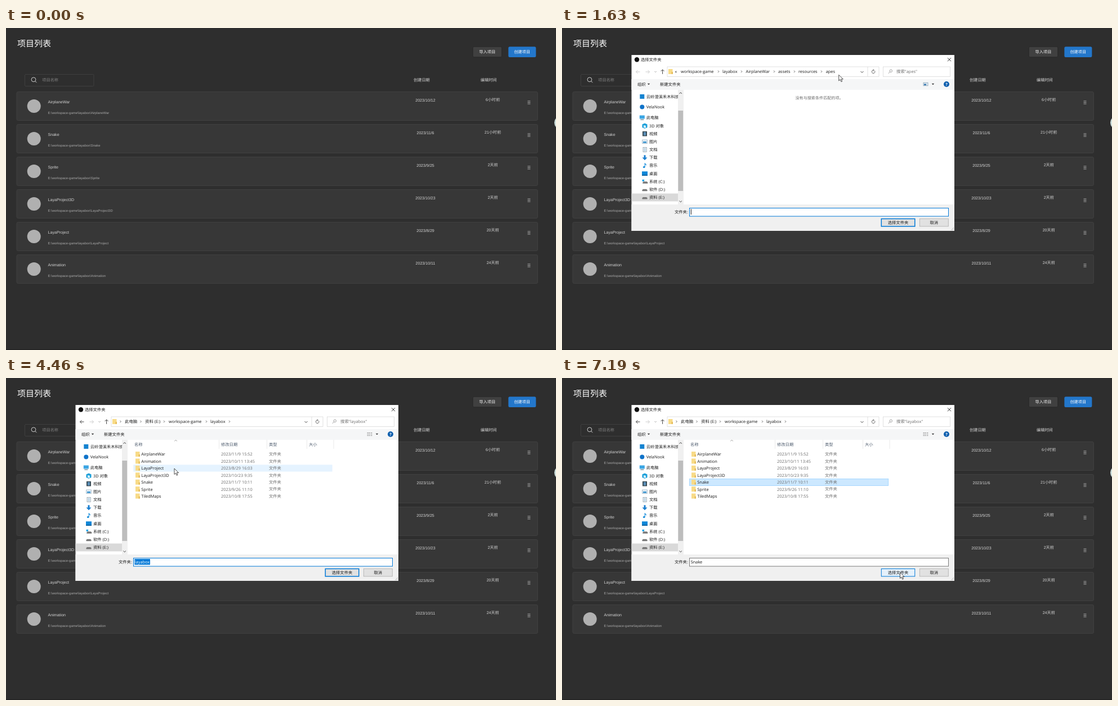
Recreate the animation shown at these times as an HTML page. Size 977 by 573 pixels, loop 8 s.

```html
<!DOCTYPE html>
<html lang="zh-CN">
<head>
<meta charset="utf-8">
<title>项目列表</title>
<style>
html, body { margin: 0; width: 100%; height: 100%; overflow: hidden; background: #2e2e2e; }
svg { display: block; width: 100vw; height: 100vh; }
text { text-rendering: geometricPrecision; white-space: pre; }
.app text { font-family: "Liberation Sans", "Noto Sans CJK SC", "Noto Sans CJK", sans-serif; }
.dlg text { font-family: "Open Sans", "Noto Sans CJK SC", "Noto Sans CJK", sans-serif; }
</style>
</head>
<body>
<svg id="stage" viewBox="0 0 977 573"></svg>
<script>
const LOOP = 8000;

// Markup helpers; text is placed by its vertical centre.
const rect = (x, y, w, h, fill, more = '') =>
  `<rect x="${x}" y="${y}" width="${w}" height="${h}" fill="${fill}" ${more}/>`;
const box = (x, y, w, h, fill, stroke, more = '') =>
  rect(x, y, w, h, fill, `stroke="${stroke}" ${more}`);
const dot = (x, y, r, fill, more = '') => `<circle cx="${x}" cy="${y}" r="${r}" fill="${fill}" ${more}/>`;
const line = (d, stroke, w = 0.8, more = '') =>
  `<path d="${d}" fill="none" stroke="${stroke}" stroke-width="${w}" ${more}/>`;
const shape = (d, fill) => `<path d="${d}" fill="${fill}"/>`;
const text = (x, cy, s, fill, size = 7.4, more = '') =>
  `<text x="${x}" y="${cy + size * 0.36}" fill="${fill}" font-size="${size}" ${more}>${s}</text>`;
const group = (id, body, more = '') => `<g id="${id}" ${more}>${body}</g>`;
const mid = 'text-anchor="middle"';

// ---- Project list page ----
const BG = '#2e2e2e';
const projects = [
  ['AirplaneWar', '2023/10/12', '6小时前'],
  ['Snake', '2023/11/6', '21小时前'],
  ['Sprite', '2023/9/25', '2天前'],
  ['LayaProject3D', '2023/10/23', '2天前'],
  ['LayaProject', '2023/8/29', '20天前'],
  ['Animation', '2023/10/11', '24天前'],
];

function projectRow([name, created, edited], i) {
  const y = 113 + i * 58;
  return box(19, y + 0.5, 925.5, 51, '#373737', '#404040', 'rx="2.5" stroke-width="1"') +
    dot(49.7, y + 26, 12, '#b0b0b0') +
    text(74.5, y + 18.2, name, '#d2d2d2', 7.1) +
    text(74.5, y + 37.8, 'E:\\workspace-game\\layabox\\' + name, '#a8a8a8', 5.95) +
    text(745, y + 15.6, created, '#d2d2d2', 7.1, mid) +
    text(864.7, y + 14.6, edited, '#d2d2d2', 7.1, mid) +
    line([17, 19.5, 22].map(d => `M926.5 ${y + d}h5`).join(''), '#b5b5b5', 0.9);
}

const page =
  rect(0, 0, 977, 573, BG) +
  rect(0, 571.5, 977, 1.5, '#222') +
  text(20, 27.7, '项目列表', '#fff', 15) +
  box(829.3, 33.3, 51.4, 18.4, '#404040', '#262626', 'id="importBtn" rx="2" stroke-width=".8"') +
  text(855, 42, '导入项目', '#f2f2f2', 7.2, mid + ' font-weight="500"') +
  rect(892.4, 33.2, 49, 18.8, '#2377cb', 'rx="2.5"') +
  text(916.8, 42, '创建项目', '#fff', 7.2, mid + ' font-weight="500"') +
  box(33.5, 82.5, 122.5, 21, BG, '#3f3f3f', 'rx="1.5"') +
  dot(49, 91.8, 3.9, 'none', 'stroke="#ccc" stroke-width="1"') + line('M51.8 94.6l2.6 2.6', '#ccc', 1) +
  text(64.3, 92.7, '项目名称', '#808080', 7.2) +
  text(724, 92.5, '创建日期', '#d8d8d8', 7.2) +
  text(843, 92.5, '编辑时间', '#d8d8d8', 7.2) +
  projects.map(projectRow).join('') +
  dot(986, 168.5, 12, '#cfe0dc');

// ---- Folder dialog ----
const INK = '#1a1a1a', SOFT = '#6d6d6d', BLUE = '#0078d7', GREY = '#7a7a7a';
const chevron = (x, y = 77.5) => line(`M${x - 1} ${y - 1.8}l1.8 1.8l-1.8 1.8`, '#444', 0.8);
const caretDown = (x, y) => shape(`M${x - 2.2} ${y - 1.2}h4.4l-2.2 2.5z`, '#333');
const folder = (x, y) => rect(x, y, 7.5, 9, '#f8db88') + shape(`M${x + 5.5} ${y + 9}v-4h2.5v4z`, '#e6bd5c');
const arrow = (x, dir, color) =>
  line(`M${x - 3.5} 78h7M${x + dir * 3.5} 78l${-dir * 3} -3m${dir * 3} 3l${-dir * 3} 3`, color, 0.9);
const crumbs = list => list.map(([x, s]) => s === '>' ? chevron(x) : text(x, 77.5, s, INK)).join('');

const chrome =
  rect(123.5, 48, 573.5, 313, '#fff') +
  dot(133, 56.3, 4.2, '#111') +
  text(140, 56.6, '选择文件夹', INK, 7.3) +
  line('M685 53.2l6 6m0 -6l-6 6', INK, 0.9) +
  line('M178.6 82v-8m-3 3l3 -3l3 3', '#333', 0.9) +
  line('M164.3 77l1.8 1.8l1.8 -1.8', '#999', 0.8) +
  box(187, 69, 376, 17.5, '#fff', '#d9d9d9', 'stroke-width=".8"') +
  line('M543 69v17.5', '#d9d9d9') +
  line('M530.5 77l2.5 2.5l2.5 -2.5', '#333', 0.9) +
  line('M555.4 76.2a2.8 2.8 0 1 1 -2.4 -1.2M552.4 73.6l2 1.4l-2 1.5', '#444', 0.8) +
  box(570.5, 69, 119, 17.5, '#fff', '#d9d9d9', 'stroke-width=".8"') +
  dot(584.3, 76.3, 2.2, 'none', 'stroke="#777" stroke-width=".7"') + line('M582.7 78l-3 3', '#777', 0.7) +
  rect(123.5, 91, 573.5, 19, '#f5f6f7') +
  dot(683, 100, 5, '#0f5fae') + text(683, 100, '?', '#fff', 7.4, mid + ' font-weight="700"') +
  rect(123.5, 314, 573.5, 47, '#f0f0f0') +
  text(200, 327.5, '文件夹:', INK, 7.3) +
  box(226.5, 320.5, 460, 14.5, '#fff', BLUE, 'id="field" stroke-width="1"') +
  box(567.3, 339.5, 59.5, 13.5, '#e1e1e1', BLUE, 'id="okBtn" stroke-width="1.5"') +
  text(597, 346, '选择文件夹', INK, 7.3, mid) +
  box(635.3, 339.3, 51, 13.7, '#e1e1e1', '#adadad', 'stroke-width=".8"') +
  text(660.8, 346, '取消', INK, 7.3, mid) +
  line('M691 360l5 -5m-2.5 5l2.5 -2.5', '#b0b0b0', 0.8);

const toolbar =
  text(134, 100.3, '组织', INK, 7.3) + caretDown(154, 100) +
  text(174, 100.3, '新建文件夹', INK, 7.3) + caretDown(659, 100);

// Sidebar icons are drawn around (x, y).
const icons = {
  square: (x, y) => rect(x - 4, y - 4, 8, 8, '#1583d0'),
  disc: (x, y) => dot(x, y, 4, '#0f73c9'),
  pc: (x, y) => rect(x - 4.5, y - 4, 9, 6, '#3aa5e4') + rect(x - 3, y + 3, 6, 1.2, '#5a7a90'),
  cube: (x, y) => shape(`M${x} ${y - 4.5}l4.5 2v5.5l-4.5 2l-4.5 -2v-5.5z`, '#1c9fd9') +
    shape(`M${x - 2} ${y - 1}l4 .8v4.2l-4 -.8z`, '#d5f1fb'),
  film: (x, y) => rect(x - 4, y - 4.3, 8, 8.6, '#37474f') + rect(x - 2.2, y - 3, 4.4, 6, '#5b8fb9'),
  image: (x, y) => box(x - 4.3, y - 3.3, 8.6, 6.6, '#e9f3fa', '#8aa4b5', 'stroke-width=".7"') +
    rect(x - 3, y - 0.3, 6, 2.4, '#2b8ac9'),
  doc: (x, y) => box(x - 3, y - 4, 6.2, 8, '#fff', '#7a8d99', 'stroke-width=".7"') +
    line(`M${x - 1.8} ${y - 2}h4m-4 2h4m-4 2h4`, '#5f9ac4', 0.7),
  down: (x, y) => shape(`M${x - 1.5} ${y - 4.5}h3v4.2h3l-4.5 4.8l-4.5 -4.8h3z`, '#1b7fd0'),
  note: (x, y) => dot(x - 1.3, y + 2.6, 1.8, '#1b8fdb') + line(`M${x + 0.2} ${y + 2.6}v-7q.5 2 2.8 3.5`, '#1b8fdb', 1.1),
  desk: (x, y) => rect(x - 5, y - 3.8, 10, 7.6, '#0f87d8') + rect(x - 5, y + 2.3, 10, 1.5, '#0a5a96'),
  sys: (x, y) => rect(x - 4.5, y - 3.5, 3.6, 3.2, '#1ea4e8') + icons.disk(x + 0.8, y + 0.5),
  disk: (x, y) => shape(`M${x - 4.5} ${y + 1}l1.5 -1.5h6l1.5 1.5v2h-9z`, '#777'),
  pin: (x, y) => dot(x, y, 2.5, '#2f8fd8') + line(`M${x - 4} ${y + 3.5}l3 -2.5`, '#2f8fd8'),
};
const ORG = '云岭澄溪禾木科技';
const tree = [
  ['cube', '3D 对象'], ['film', '视频'], ['image', '图片'], ['doc', '文档'], ['down', '下载'],
  ['note', '音乐'], ['desk', '桌面'], ['sys', '系统 (C:)'], ['disk', '软件 (D:)'], ['disk', '资料 (E:)'],
];
const topItem = (y, icon, s) => icons[icon](142.3, y) + text(149.7, y, s, INK, 7.3);
const sidebar =
  rect(123.5, 294.5, 82.5, 14, '#d9d9d9') +
  topItem(122, 'square', ORG) + topItem(140.5, 'disc', 'VelaNook') + topItem(159.5, 'pc', '此电脑') +
  tree.map(([icon, s], i) => icons[icon](147, 174 + i * 14.17) + text(155, 174 + i * 14.17, s, INK, 7.3)).join('') +
  rect(206, 110, 10, 204, '#f0f0f0') + rect(206.3, 147, 8.8, 143, '#bdbdbd') +
  line('M208.4 117l2.3 -2.3l2.3 2.3M208.4 307.5l2.3 2.3l2.3 -2.3', '#333', 0.9);
const earlySidebar =
  rect(130, 194, 85, 13.5, '#d9d9d9') +
  [['pin', '快速访问'], ['disc', 'QTR云盘'], ['square', ORG + '有'], ['disc', 'VelaNook'], ['pc', '此电脑'], ['square', '网络']]
    .map(([icon, s], i) => topItem(125 + i * 18.95, icon, s)).join('');

const hl = (id, x, w) => rect(x, 69.5, w, 16.5, '#e1f0fb', `id="${id}" opacity="0"`);
const emptyView =
  hl('hlWork', 209, 74.5) + hl('hlLaya', 283.5, 41) + hl('hlAir', 324.5, 57.5) +
  arrow(135, -1, '#c8c8c8') +
  text(200.5, 77, '«', INK) +
  crumbs([[211, 'workspace-game'], [278, '>'], [285, 'layabox'], [319, '>'], [326.5, 'AirplaneWar'], [377, '>'],
    [384, 'assets'], [413, '>'], [420, 'resources'], [461, '>'], [468.7, 'apes']]) +
  text(594, 77.6, '搜索"apes"', SOFT) +
  text(414.5, 124, '没有与搜索条件匹配的项。', SOFT, 7.1) +
  group('viewIcon', box(642, 97.2, 8, 5.6, '#dfe9f1', '#7f98ab', 'stroke-width=".7"') + rect(643, 99.5, 4, 2.4, '#3477b0')) +
  line('M229.3 322v10', '#000', 0.9, 'id="caret"');

const files = [
  ['AirplaneWar', '2023/11/9 15:52'], ['Animation', '2023/10/11 13:45'], ['LayaProject', '2023/8/29 16:03'],
  ['LayaProject3D', '2023/10/23 9:35'], ['Snake', '2023/11/7 10:11'], ['Sprite', '2023/9/26 11:10'],
  ['TiledMaps', '2023/10/8 17:55'],
];
const ROW = 12.43, ROW_TOP = 129.5;
const fileView =
  arrow(135, -1, '#333') +
  crumbs([[203.5, '>'], [211, '此电脑'], [239.5, '>'], [247, '资料 (E:)'], [281, '>'],
    [289, 'workspace-game'], [356, '>'], [363, 'layabox'], [397, '>']]) +
  text(594, 77.6, '搜索"layabox"', SOFT) +
  line([641.5, 644.5, 648].map(x => `M${x} 97.5h2.4m-2.4 2.5h2.4m-2.4 2.5h2.4`).join(''), '#777', 0.8) +
  [[228, '名称'], [382, '修改日期'], [467, '类型'], [538, '大小']].map(([x, s]) => text(x, 118, s, '#4c5a6c', 7.3)).join('') +
  line([378.5, 463.5, 534.5, 582].map(x => `M${x} 110v16`).join(''), '#e5e5e5') +
  line('M299.3 112.3l2.3 -1.8l2.3 1.8', '#777', 0.7) +
  rect(226.3, 0, 353.4, 12.2, '#e5f3ff', 'id="hover"') +
  box(226.3, ROW_TOP + 4 * ROW + 0.3, 353.4, 12, '#cce8ff', '#99d1ff', 'id="picked" stroke-width=".8"') +
  files.map(([name, date], i) => {
    const y = 135.7 + i * ROW;
    return folder(230, y - 4.7) + text(240.3, y, name, INK) + text(382, y, date, SOFT) + text(467, y, '文件夹', SOFT, 7.3);
  }).join('') +
  group('oldName', rect(228.3, 322, 27.7, 10.3, BLUE) + text(228.7, 327, 'layabox', '#fff')) +
  group('newName', text(228.7, 327, 'Snake', INK));

const dialog = chrome + folder(189, 73) + arrow(152, 1, '#c8c8c8') +
  group('toolbar', toolbar) + group('early', earlySidebar) +
  group('sidebar', sidebar) + group('emptyView', emptyView) + group('fileView', fileView);

const pointer = '<path d="M0 0V10.5L2.5 8.2L4.2 12.2L6 11.4L4.3 7.6H7.6Z" fill="#fff" stroke="#000" stroke-width=".7"/>';

document.getElementById('stage').innerHTML =
  group('page', page, 'class="app"') + group('dialog', dialog, 'class="dlg"') + group('cursor', pointer);

// ---- Motion ----
const $ = {};
document.querySelectorAll('[id]').forEach(e => $[e.id] = e);
const show = (e, on) => e.setAttribute('visibility', on ? 'inherit' : 'hidden');
const set = (e, key, v) => e.setAttribute(key, v);

// Linear interpolation through rows of [time, ...values].
function at(keys, t) {
  if (t <= keys[0][0]) return keys[0].slice(1);
  const i = keys.findIndex(k => k[0] > t);
  if (i < 0) return keys[keys.length - 1].slice(1);
  const a = keys[i - 1], b = keys[i], p = (t - a[0]) / (b[0] - a[0]);
  return a.slice(1).map((v, n) => v + (b[n + 1] - v) * p);
}

const cursorPath = [
  [120, 932, 552], [400, 917, 480], [650, 892, 230], [830, 868, 60], [950, 861, 44], [1290, 860.5, 41.5],
  [1425, 850.5, 51], [1560, 640, 75], [1700, 340, 92], [1830, 285, 84], [2100, 262, 79], [2450, 272, 80],
  [2590, 316.5, 84], [2740, 338, 82], [2900, 330, 82], [3160, 304, 81], [3760, 304, 81], [4000, 306, 112],
  [4300, 301, 152], [4440, 299, 161], [4530, 298, 163], [4800, 275, 177], [5140, 257, 187], [5340, 259.3, 188],
  [5800, 259.3, 188], [6050, 400, 270], [6300, 580, 365], [6480, 611, 381], [6640, 608, 367], [6900, 603, 352],
  [7170, 600.5, 346],
];
const opening = [[1285, 0.958, 0.15], [1355, 0.979, 0.55], [1425, 0.991, 0.85], [1500, 1, 1]];
const fades = {
  hlWork: [[1800, 0], [1970, 1], [2590, 0.9], [2740, 0]],
  hlLaya: [[2520, 0], [2590, 0.35], [2680, 0.6], [2800, 0], [2930, 0], [3070, 1]],
  hlAir: [[2620, 0], [2740, 1], [2900, 1], [3070, 0]],
};
const CX = 402, CY = 192, STEP = 68.6;

function draw(time) {
  const t = 120 + Math.floor((time - 120) / STEP) * STEP;
  const [x, y] = at(cursorPath, t);
  show($.cursor, t >= 120);
  set($.cursor, 'transform', `translate(${x} ${y})`);
  set($.importBtn, 'fill', x > 829 && x < 881 && y > 33 && y < 52 ? '#434343' : '#404040');

  const [scale, alpha] = at(opening, t);
  show($.dialog, t >= 1280);
  set($.dialog, 'opacity', alpha);
  set($.dialog, 'transform', `translate(${CX} ${CY}) scale(${scale}) translate(${-CX} ${-CY})`);

  const loaded = t >= 1350, moved = t >= 3750, picked = t >= 5600;
  show($.early, !loaded);
  show($.toolbar, loaded);
  show($.sidebar, loaded);
  show($.viewIcon, loaded && !moved);
  show($.emptyView, !moved);
  show($.fileView, moved);
  for (const id in fades) set($[id], 'opacity', at(fades[id], t)[0]);
  show($.caret, !moved && (t < 1895 || Math.floor((t - 1895) / 530) % 2 === 1));

  const row = Math.floor((y - ROW_TOP) / ROW);
  const over = x > 226 && x < 580 && row >= 0 && row < files.length;
  show($.hover, moved && over && !(picked && row === 4));
  set($.hover, 'y', ROW_TOP + row * ROW);
  show($.picked, picked);
  show($.oldName, !picked);
  show($.newName, picked);
  set($.field, 'stroke', loaded && t < 5800 ? BLUE : GREY);

  const onOk = t > 6600 && x > 567 && x < 627 && y > 339 && y < 353;
  set($.okBtn, 'fill', onOk ? '#e5f1fb' : '#e1e1e1');
  set($.okBtn, 'stroke-width', onOk ? 1 : 1.5);
}

function tick() {
  draw(performance.now() % LOOP);
  requestAnimationFrame(tick);
}
tick();
</script>
</body>
</html>
```
